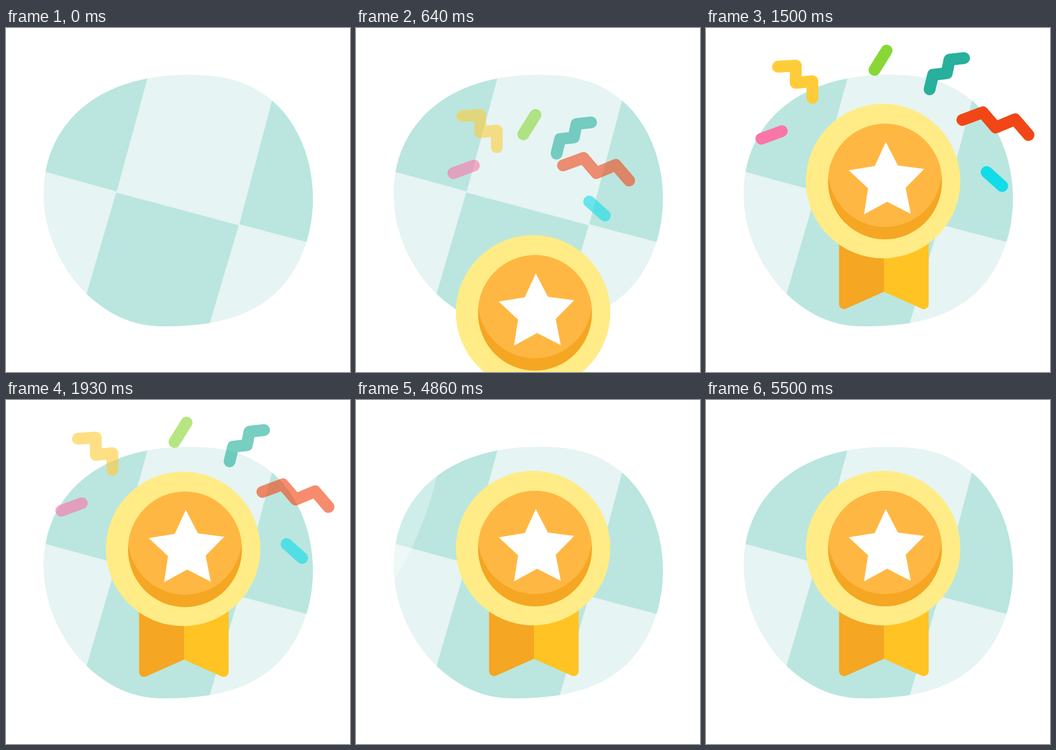
Recreate the animation shown at these times as an HTML page. Size 640 by 640 pixels, loop 6870 ms.

```html
<!DOCTYPE html>
<html>
<head>
<meta charset="utf-8">
<style>
html, body { margin: 0; width: 100%; height: 100%; overflow: hidden; background: #fff }
svg { display: block; width: 100vw; height: 100vh }
#confetti { fill: none; stroke-width: 22; stroke-linecap: round; stroke-linejoin: round }
</style>
</head>
<body>
<svg viewBox="0 0 640 640">
  <defs>
    <path id="blob" d="M70 308C70 187 161 87 340 87C410 87 452 100 495 135C545 178 571 248 571 317C571 347 566 376 559 398C530 488 470 533 379 549C345 554 318 555 290 555C240 555 194 536 150 495C102 448 70 380 70 308Z"/>
    <ellipse id="disc" cx="333" cy="276.5" rx="106" ry="107.5"/>
    <clipPath id="inBlob"><use href="#blob"/></clipPath>
    <clipPath id="inDisc"><use href="#disc"/></clipPath>
  </defs>
  <use href="#blob" fill="#e6f4f3"/>
  <path clip-path="url(#inBlob)" fill="#bae6df" d="M269 72L206 304L60 264V72ZM500 116L434 365L600 409V116ZM205 306L433 367L372 573H127Z"/>
  <g id="confetti"></g>
  <g id="medal">
    <path fill="#f5a623" d="M247.5 300H331V481.5L261 512.8C254 515.8 247.5 511 247.5 504Z"/>
    <path fill="#ffc423" d="M414.3 300H331V481.5L401 512.8C408 515.8 414.3 511 414.3 504Z"/>
    <circle cx="329.5" cy="275.5" r="143.7" fill="#ffec86"/>
    <use href="#disc" fill="#f5a623"/>
    <ellipse cx="333" cy="254.5" rx="106" ry="106.5" fill="#ffb743" clip-path="url(#inDisc)"/>
    <path fill="#fff" d="M334.5 203L357 246.5L406 253L371.5 288L381 336.5L337 314L294 337.5L301.5 289L265.5 255.5L314 247.5Z"/>
  </g>
  <g clip-path="url(#inBlob)">
    <circle id="shine" cx="-530" cy="-22" r="635" fill="none" stroke="#fff" stroke-width="130" opacity=".3"/>
  </g>
</svg>
<script>
const LOOP = 6870, STEP = 1000 / 14;
const $ = id => document.getElementById(id);

// colour, resting points, offset of the launch position
const pieces = [
  ['#ffcc38', '134,72 167,70 167,102 198,99 198,130', 154, 221],
  ['#fb74a8', '103,206 141,192', 188, 154],
  ['#88d735', '336,42 313.5,78', -5, 288],
  ['#26b09c', '480,56 453,59 448,84 422.5,87 416,114', -103, 288],
  ['#f24515', '477,171 515,157 539,185 575,170 600,199', -221, 204],
  ['#12dce8', '522,268 551,294', -212, 132]
].map(([stroke, points, dx, dy]) => {
  const el = document.createElementNS('http://www.w3.org/2000/svg', 'polyline');
  el.setAttribute('points', points);
  el.setAttribute('stroke', stroke);
  $('confetti').append(el);
  return { el, dx, dy };
});

const drop = [[0, 520], [320, 440], [640, 253.5], [930, 75], [1150, 34], [1430, 13.5], [1500, 9.2], [1750, 2.5], [2280, 0]];
const fade = [[0, 0], [640, .59], [930, .97], [1000, 1], [1430, 1], [2430, 0]];

// monotone cubic interpolation through [time, value] keys
function curve(keys, t) {
  const last = keys.length - 1;
  if (t >= keys[last][0]) return keys[last][1];
  const slope = i => (keys[i + 1][1] - keys[i][1]) / (keys[i + 1][0] - keys[i][0]);
  const tangent = i => {
    if (i === 0) return slope(0);
    if (i === last) return slope(last - 1);
    const a = slope(i - 1), b = slope(i);
    return a * b > 0 ? 2 * a * b / (a + b) : 0;
  };
  const i = keys.findIndex(k => k[0] > t) - 1;
  const [t0, v0] = keys[i], [t1, v1] = keys[i + 1];
  const h = t1 - t0, u = (t - t0) / h, w = 1 - u;
  return v0 * w * w * (1 + 2 * u) + v1 * u * u * (3 - 2 * u)
    + h * u * w * (w * tangent(i) - u * tangent(i + 1));
}

const smooth = u => u >= 1 ? 1 : u * u * (3 - 2 * u);
const move = (el, x, y) => el.setAttribute('transform', `translate(${x} ${y})`);

// the motion advances 14 times a second, on 10 ms ticks
function poseTime(t) {
  const tick = n => Math.round(n * STEP / 10) * 10;
  const n = Math.round(t / STEP);
  return tick(n) > t ? tick(n - 1) : tick(n);
}

function draw(now) {
  const t = poseTime(now % LOOP);
  move($('medal'), 0, curve(drop, t));
  const away = 1 - smooth(t / 1150);
  for (const { el, dx, dy } of pieces) {
    move(el, dx * away, dy * away);
    el.setAttribute('opacity', curve(fade, t));
  }
  $('shine').style.display = t >= 4860 && t < 5500 ? '' : 'none';
  move($('shine'), (t - 4860) * 1.2, 0);
}

const start = performance.now();
function frame() {
  draw(performance.now() - start);
  requestAnimationFrame(frame);
}
frame();
</script>
</body>
</html>
```
